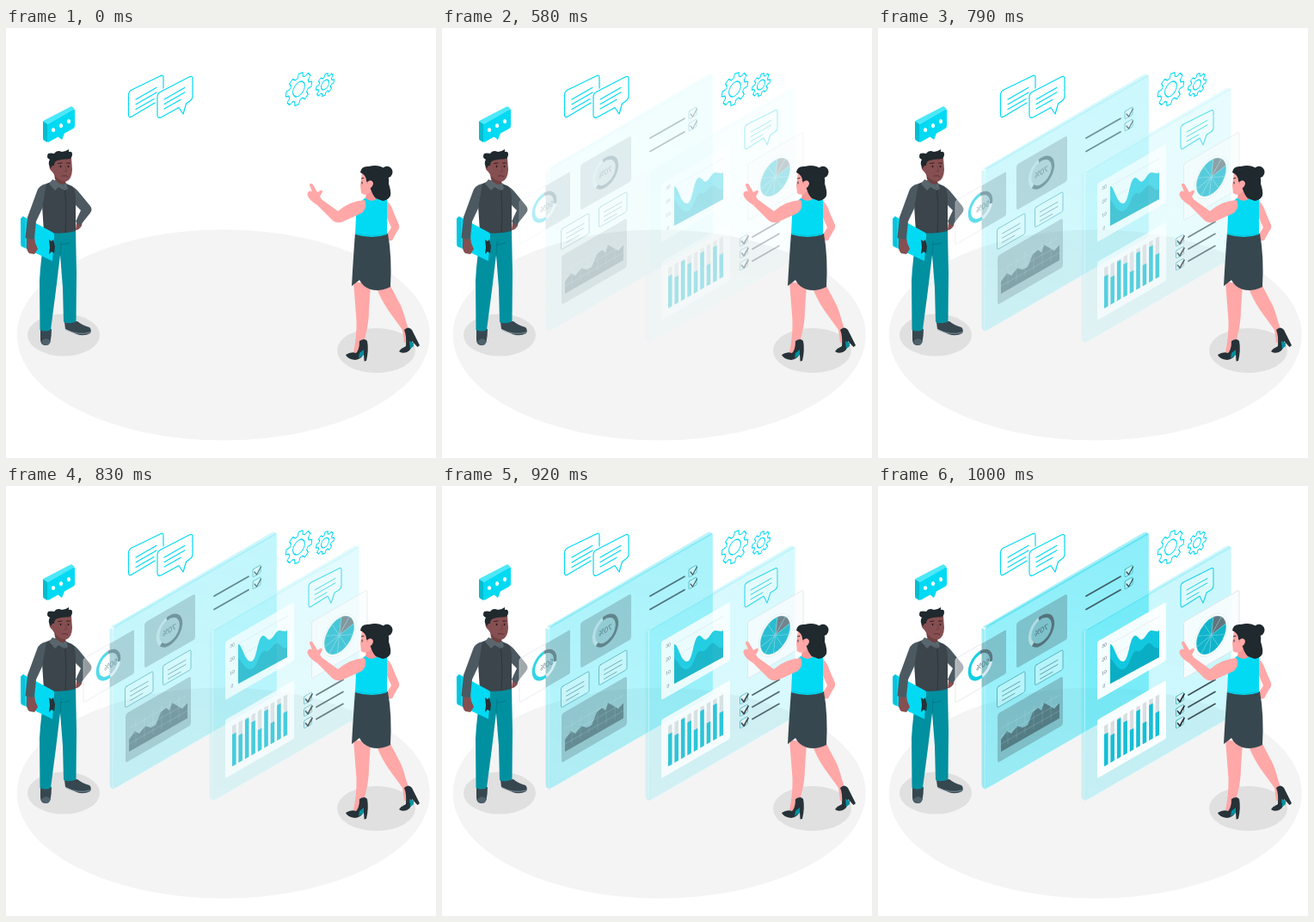
Animation, 500 px wide and 500 px high, one loop 1040 ms. Source, as an HTML page with a canvas:

```html
<!DOCTYPE html>
<html lang="en">
<head>
<meta charset="utf-8">
<title>Data presentation</title>
<style>
html, body { margin: 0; width: 100%; height: 100%; overflow: hidden; background: #fff; }
canvas { display: block; width: 500px; height: 500px; }
</style>
</head>
<body>
<canvas id="stage"></canvas>
<script>
const SIZE = 500, LOOP = 1040, STEP = 1000 / 24, COS = 0.866;
const CYAN = '#02daf3', TEAL = '#0090a0', DARK = '#37474f', INK = '#263238';
const SKIN = '#ffa8a7', BROWN = '#864f51', TINT = 'rgba(80,105,115,.34)';
const dpr = window.devicePixelRatio || 1;
const stage = document.getElementById('stage');
let c;

function setup(canvas) {
  canvas.width = canvas.height = SIZE * dpr;
  const ctx = canvas.getContext('2d');
  ctx.scale(dpr, dpr);
  ctx.lineJoin = ctx.lineCap = 'round';
  return ctx;
}

function layer(draw) {
  const canvas = document.createElement('canvas');
  c = setup(canvas);
  draw();
  return canvas;
}

function paint(path, fill, stroke, width = 1) {
  if (fill) { c.fillStyle = fill; c.fill(path); }
  if (stroke) { c.strokeStyle = stroke; c.lineWidth = width; c.stroke(path); }
}

const shape = (d, fill, stroke, width) => paint(new Path2D(d), fill, stroke, width);

function oval(x, y, rx, ry, fill, stroke, width) {
  const p = new Path2D();
  p.ellipse(x, y, rx, ry, 0, 0, 7);
  paint(p, fill, stroke, width);
}

// Draws in the isometric wall plane with its origin at x, y.
function iso(x, y, draw) {
  c.save();
  c.transform(COS, -0.5, 0, 1, x, y);
  draw();
  c.restore();
}

function card(x, y, w, h, r, fill, stroke, width) {
  iso(x, y, () => {
    const p = new Path2D();
    p.roundRect(0, 0, w / COS, h, r);
    paint(p, fill, stroke, width);
  });
}

function clipX(from, to, draw) {
  c.save();
  c.beginPath();
  c.rect(from, 0, to - from, SIZE);
  c.clip();
  draw();
  c.restore();
}

// Parallel sloping lines; each length is the horizontal reach.
function rows(x, y, gap, reach, color, width) {
  reach.forEach((w, i) => {
    const top = y + i * gap;
    shape(`M${x} ${top}l${w} ${-w * 0.57}`, null, color, width);
  });
}

function ring(x, y, r, from, to, color, width) {
  iso(x, y, () => {
    const p = new Path2D();
    p.arc(0, 0, r, from, to);
    c.lineCap = 'butt';
    paint(p, null, color, width);
  });
}

function label(text, x, y, size, color, mirrored) {
  iso(x, y, () => {
    if (mirrored) c.scale(-1, 1);
    c.font = `${size}px Lato, sans-serif`;
    c.textAlign = 'center';
    c.textBaseline = 'middle';
    c.fillStyle = color;
    c.fillText(text, 0, 0);
  });
}

function gear(x, y, r, teeth, hole) {
  iso(x, y, () => {
    const p = new Path2D(), slice = Math.PI * 2 / teeth;
    for (let i = 0; i < teeth; i++) {
      [[-0.34, 0.76], [-0.2, 1], [0.2, 1], [0.34, 0.76]].forEach(([a, k]) => {
        const t = (i + a) * slice + 0.15;
        p.lineTo(Math.cos(t) * r * k, Math.sin(t) * r * k);
      });
    }
    p.closePath();
    p.moveTo(hole, 0);
    p.arc(0, 0, hole, 0, Math.PI * 2);
    paint(p, null, CYAN, 1.2);
  });
}

function checkbox(x, y, size, ink, weight) {
  card(x, y, size, size, 1, 'rgba(255,255,255,.35)', '#3aaec0', 0.8);
  shape(`M${x + 2} ${y + 3}l2.500 3l5 -9`, null, ink, weight);
}

function icons() {
  shape('M173 87L147 102.500Q142.500 105.500 142.500 101V78Q142.500 74 146 72L179 56Q183 53.500 183 58V70', null, CYAN, 1.2);
  shape('M176 101V80Q176 76 180 74L213 57Q217 55 217 59V79Q217 83 213 85.500L209.500 88L206 100L201 92.500L181 103.500Q176 106 176 101Z', '#fff', CYAN, 1.2);
  rows(151, 83, 5.7, [24, 24, 21], CYAN, 1.2);
  rows(184, 83, 5.5, [24, 24, 19], CYAN, 1.2);
  gear(340.5, 71, 17.6, 8, 8);
  gear(371, 66, 12.2, 8, 5.2);

  shape('M43 109Q43 108 45 107L76 91L80 94L48 112Z', '#4ce8f8');
  shape('M43 108.500L48 111.500V133L44 130.500Q43 130 43 128Z', '#05bdd0');
  shape('M48 112L78 95Q80 94 80 96V114Q80 116 78 117L68 122.500L65 130L60.500 126.500L50 132.500Q48 133.500 48 131Z', CYAN);
  [[55, 118.500], [64, 113.5], [73, 108.5]].forEach(([x, y]) => oval(x, y, 2.1, 2.6, '#fff'));
}

function man() {
  // shoes and trousers
  shape('M40 350H53Q53 358 51.500 365Q49 369.500 45 369Q40 368 40 362Z', DARK);
  shape('M41 365Q46 358 52 364L50 368Q45 371 41 365Z', '#4f626c');
  shape('M68 342L83 341Q89 346 97 348Q100 351 98 355Q90 359 82 356L69 350Z', DARK);
  shape('M70 351Q84 358 98 354', null, '#90a4ae', 0.8);
  shape('M46 235Q40 270 39 294L39.500 351Q46 354 52 351L58 305L63 264L66 302L67 342Q74 345 81.500 341L82 285L81 234Z', TEAL);
  shape('M63 264L64 248M64 252L74 250', null, '#007987', 0.9);

  // far arm
  shape('M82 226L89 224L88 230Q85 235 81 235Z', BROWN);
  shape('M74 183Q80 185 84 190L98 207Q101 211 98 215L86 230L81 225L87 212L78 203Z', '#4c5961');

  // torso
  shape('M47 181L57 177L68 180L77 184Q81 188 81 200L81 236Q63 241 44 237L42 206Q39 190 47 181Z', '#3b454b');
  shape('M68 184Q71 208 69 237', null, '#273238', 0.8);
  shape('M54 176L66 181L68 189L61 185L57 189L50 181Z', '#59666e');
  shape('M66 181L70 180L72 187L68 189Z', '#59666e');

  // clipboard and near arm
  shape('M17 222L20 219L55 238Q57 240 56 243L54 271L18 254Q17 253 17 251Z', CYAN);
  shape('M17 222L20 219L22 222V255L18 254Z', '#06c4dc');
  shape('M50 246L53 248L55 246L57 254L56 262L53 260L50 263L51 255Z', INK);
  shape('M24 242L33 243L34 250L37 257L33 263L27 262Q23 258 24 250Z', BROWN);
  shape('M47 181Q38 183 36 190L25 220L22.500 244Q28 247 33 245L35 225L42 210Z', '#4c5961');

  // head
  shape('M55 163L57 176Q63 184 69 181L70 174Z', '#70413f');
  shape('M53 154Q62 148 76 151L77 165Q76.500 176 70 178.500Q62 178 57 172L53 166Z', BROWN);
  shape('M54 160Q49 157 51 164Q53 168 56 167Z', BROWN);
  shape('M52 163Q48 157 51 153Q46 151 49 146Q52 145 56 146Q59 141 65 144Q69 144 73 141L73 144Q77 143 77 147Q77 152 72 152.500Q65 152 60 154Q56 155 56 160L54 160Z', '#1f292e');
  oval(63.5, 161, 0.8, 1.2, '#251719');
  oval(72.5, 161, 0.8, 1.2, '#251719');
  shape('M60.500 157.500L65 157M70.500 157L74.500 157', null, '#35201f', 1);
  shape('M69 161L70.500 166.500L68 167', null, '#6a393c', 0.7);
  shape('M65 172Q69 171 72 172.500', null, '#542c2f', 0.8);
}

function woman() {
  // legs
  shape('M404 295Q406 320 407.500 340Q408 360 403.500 379L412 383Q414 370 418 358Q422 342 422 328L424 298Z', SKIN);
  shape('M430 300Q436 316 445 329L461 351L463 366L470 365Q468 348 465 341Q461 325 456 317L446 298Z', SKIN);
  shape('M395 380Q401 376 407 378Q411 374 411 364Q417 360 420 364Q422 374 419 387L416.500 387.500L416 379Q413 385 406 386Q397 385 395 380Z', INK);
  shape('M411 378L416 374L416 380L410 384Z', TEAL);
  shape('M457 376Q460 372 465 370Q466 358 463 351Q468 346 472 351L481 369L478.500 371L472 364Q473 374 466 377Q460 379 457 376Z', INK);
  shape('M469 364L474 366L474 370L470 373Z', TEAL);

  // resting arm
  shape('M441 199Q448 205 451 215L457 229Q458 233 455 236L449 247L441 248L443 240L448 232L441 216Z', SKIN);

  // skirt and top
  shape('M406 238L444 239Q449 266 447 301Q435 307 424 304Q415 301 411 293L402 300Q404 264 406 238Z', DARK);
  shape('M417 198Q428 195 443 199L443 240Q426 246 406 240L407 219Q407 205 417 198Z', CYAN);
  shape('M408 239Q426 244 442 239', null, '#08bed2', 0.8);

  // pointing arm
  shape('M417 200Q421 208 414 215L392 225Q385 228 380 224L362 206L368 200L386 213Q400 201 417 200Z', SKIN);
  shape('M362 206Q352 200 350.500 194Q350 190 354 189.500L356 190L353 183Q353 179.500 356.500 181.500L362 191L366.500 188.500Q369 189 367 192.500L365 196L369 202Z', SKIN);

  // head and hair
  shape('M420 184L418 198Q425 204 432 198L431 182Z', '#f49696');
  shape('M414 168L412 183L413 192Q416 195 421 193L429 186L428 168Z', SKIN);
  oval(443, 167.500, 6.5, 6.7, '#1f292e');
  shape('M412 168Q413 160 422 161Q433 158 441 164Q446 172 445 181Q448 190 447 195Q445 200 438 201L430 198Q426 194 424 187L419 178Q419 171 412 168Z', '#1f292e');
  shape('M420 179Q425 175 427 180Q427 185 422 187Z', SKIN);
  shape('M413.500 175L416 174.500M414 179V181', null, INK, 1);
}

function slab(x, y, w, h, low, high) {
  const g = c.createLinearGradient(x, y + h, x + w, y - 80);
  g.addColorStop(0, `rgba(11,220,243,${low})`);
  g.addColorStop(1, `rgba(11,220,243,${high})`);
  card(x, y, w, h, 4, g);
  shape(`M${x} ${y + 4}l-4 -2v${h - 8}q0 3 2 4l3 2Z`, `rgba(60,220,238,${high})`);
  shape(`M${x - 3} ${y + 1}L${x + w - 6} ${y + 1 - w * 0.577}q4 -2 6 2L${x + 2} ${y + 2}Z`, `rgba(60,220,238,${high})`);
  card(x, y, w, h, 4, null, 'rgba(220,252,255,.65)', 0.8);
}

function note(x, y, w, h) {
  card(x, y, w, h, 2, 'rgba(255,255,255,.3)', '#4aa9b8', 0.8);
  rows(x + 6, y + 5, 5.2, [w - 12, w - 12, w - 18], '#4e8c98', 0.8);
}

function areaCard() {
  card(139, 265, 76, 57, 3, TINT);
  shape('M143 295L150 285L155 288L162 279L168 281L174 278L180 263L186 258L190 261L193 252L200 256L205 259L211 252V270L143 309Z', 'rgba(62,88,97,.65)');
  rows(143, 282, 9, [68, 68, 68], 'rgba(210,240,245,.4)', 0.5);
  for (let x = 151; x < 211; x += 10) {
    const top = 277 - (x - 143) * 0.57;
    shape(`M${x} ${top}v27`, null, 'rgba(210,240,245,.3)', 0.5);
  }
}

function leftPanel() {
  clipX(85, 120.5, () => card(90, 201, 59, 51, 2, 'rgba(255,255,255,.55)', '#dce3e5', 0.7));
  clipX(120.5, 160, () => card(90, 201, 59, 51, 2, TINT));
  ring(119, 208, 14.5, 0, 7, 'rgba(235,247,249,.8)', 4);
  ring(119, 208, 14.5, 1.4, 4.7, '#13cfe3', 4);
  ring(119, 208, 14.5, 4.7, 6.5, '#587983', 4);
  label('50%', 122, 208, 9, '#4c717b', true);

  card(161, 159, 59, 53, 3, TINT);
  ring(190, 168, 15.5, 0, 7, 'rgba(205,232,237,.65)', 4);
  ring(190, 168, 15.5, -1.8, 2.4, '#54747d', 4);
  label('70%', 190, 168, 9, '#456a74', true);

  note(138.5, 234, 32.5, 24);
  note(182.5, 209, 32.5, 23);
  areaCard();
  rows(242, 128, 15.5, [40, 40], '#40606a', 1.8);
  [97, 111].forEach(y => checkbox(287, y, 9, DARK, 1.2));
}

function waveChart() {
  card(255, 181, 80, 68, 2, 'rgba(255,255,255,.93)');
  rows(270, 184, 15, [57, 57, 57, 57], '#dce4e6', 0.6);
  ['30', '20', '10', '0'].forEach((t, i) => label(t, 263, 185.5 + i * 15.8, 5.5, '#5c6b72'));
  shape('M270 184C275 184 277 204 285 204C292 204 292 175 299 174C303 174 304 181 308 178C312 175 314 168 318 168C322 168 324 170 327 168V199L270 230Z', '#12c8df');
  shape('M270 200C276 206 278 214 285 213C294 211 294 190 302 192C308 194 312 178 318 184C322 188 324 190 327 187V199L270 230Z', 'rgba(0,142,163,.45)');
}

function barChart() {
  card(255, 272, 80, 68, 2, 'rgba(255,255,255,.93)');
  [288, 289, 271, 274, 283, 261, 275, 254, 263].forEach((top, i) => {
    const x = 263 + i * 7.45, base = 326 - i * 4.28, cap = 279 - i * 4.28;
    const bar = (y, color) => shape(`M${x} ${y}l4.500 -2.600V${base - 2.6}l-4.500 2.600Z`, color);
    bar(cap, '#d9dee0');
    bar(top + 1, '#13bfd6');
  });
}

function pieCard() {
  card(355.5, 158, 64.5, 66, 2, 'rgba(250,252,253,.9)', '#dce3e5', 0.8);
  iso(387.5, 173.5, () => {
    const slices = 10, turn = Math.PI * 2 / slices;
    oval(0, 0, 22.5, 22.5, '#fff', '#dfe7e9', 0.6);
    for (let i = 0; i < slices; i++) {
      const p = new Path2D('M0 0'), from = i * turn - 1.45;
      p.arc(0, 0, 20, from, from + turn);
      p.closePath();
      paint(p, i < 2 ? '#63747c' : '#10b4cb', '#7fd6e2', 0.4);
    }
  });
}

function rightPanel() {
  waveChart();
  barChart();
  [245, 259, 273].forEach(y => checkbox(346.5, y, 9, INK, 1.7));
  rows(361, 243, 14, [31, 31, 31], '#40535b', 1.8);
  shape('M352 138V117Q352 114 355 112L387 96Q390 94 390 98V116Q390 119 387 121L382 124L378 136L374 128L355 140Q352 142 352 138Z', 'rgba(255,255,255,.35)', '#19d2e6', 1.1);
  rows(359, 121, 5.4, [24, 24, 14], '#19cbe0', 1);
  pieCard();
}

const back = layer(() => {
  c.fillStyle = '#fff';
  c.fillRect(0, 0, SIZE, SIZE);
  oval(252.7, 357, 240, 122.5, '#f4f4f4');
  oval(67, 357, 42, 24.5, '#e0e0e0');
  oval(430.5, 375, 45.5, 26, '#e0e0e0');
  icons();
  man();
});
const glass = layer(() => {
  slab(124.5, 163, 190.5, 190, 0.36, 0.47);
  slab(240.5, 167, 170, 199.5, 0.2, 0.22);
});
const charts = layer(() => { leftPanel(); rightPanel(); });
const front = layer(woman);
const view = setup(stage);

// Holds the first visible step for two steps.
function fade(ms) {
  let step = Math.floor(ms / STEP + 0.1);
  if (step === 11) step = 10;
  return Math.min(1, Math.max(0, (step - 9) / 15));
}

function put(img, alpha) {
  view.globalAlpha = alpha;
  view.drawImage(img, 0, 0, SIZE, SIZE);
}

function render(now) {
  const alpha = fade(now % LOOP);
  put(back, 1);
  // the glass is translucent twice over, so it lags behind its charts
  put(glass, alpha * alpha);
  put(charts, alpha);
  put(front, 1);
}

const start = performance.now();
function tick() {
  render(performance.now() - start);
  requestAnimationFrame(tick);
}
tick();
</script>
</body>
</html>
```
